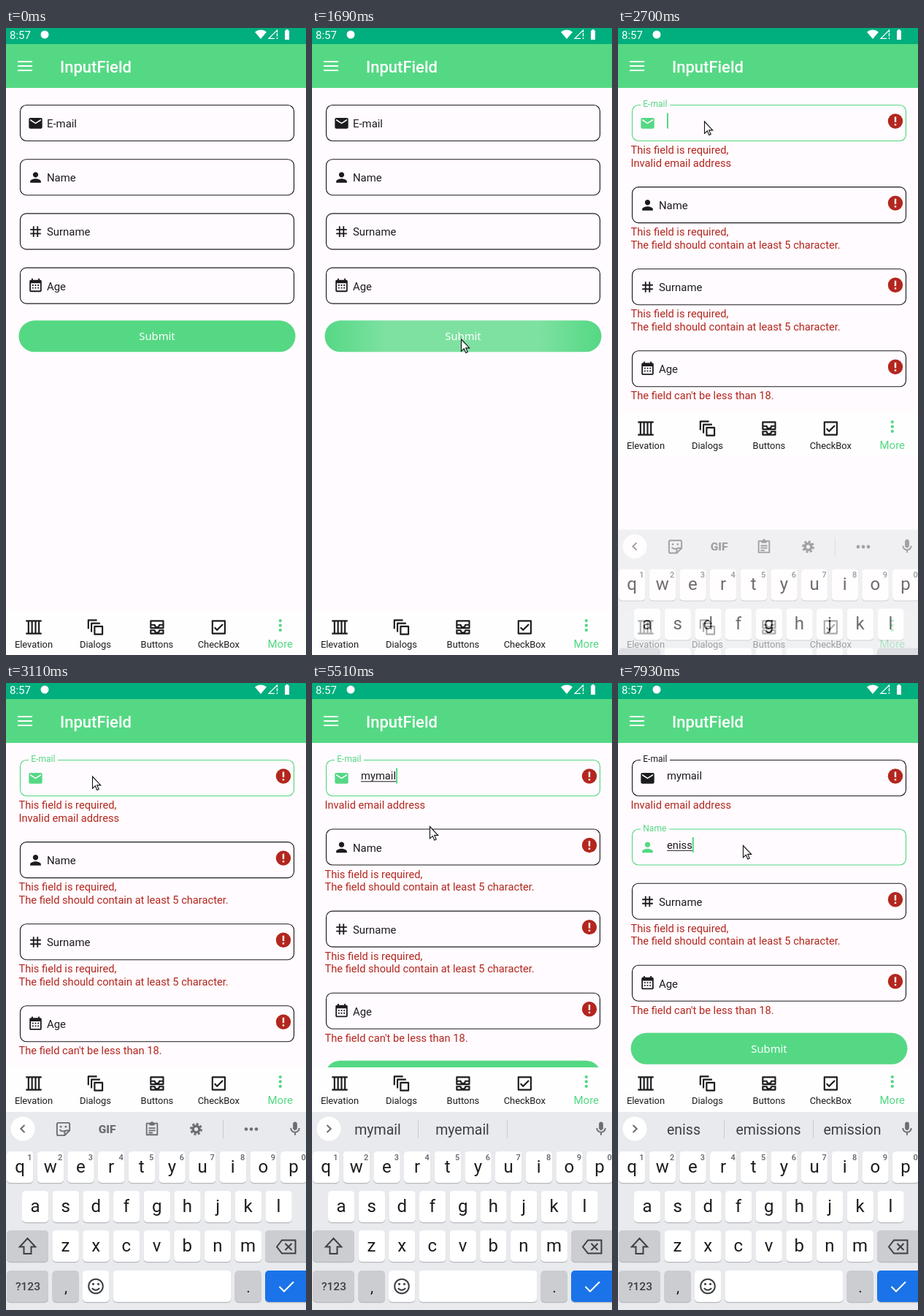
These frames come from a looping animation (411 by 858 pixels, 8000 ms). An HTML page:

```html
<!DOCTYPE html>
<html lang="en">
<head>
<meta charset="utf-8">
<title>InputField</title>
<style>
  html, body { margin: 0; width: 100%; height: 100%; overflow: hidden; background: #fffbfe; }
  svg { display: block; width: 100%; height: 100%; }
  text { font-family: Roboto, "Noto Sans", sans-serif; }
  .mid { text-anchor: middle; }
  .line { fill: none; stroke: currentColor; stroke-width: 2; }
  .ink { color: #1c1b1f; fill: #1c1b1f; }
  .tool { color: #6a6e73; fill: #6a6e73; }
  .error { fill: #b3261e; font-size: 14.65px; }
</style>
</head>
<body>
<svg id="stage" viewBox="0 0 411 858"></svg>
<script>
const LOOP = 8000;
const GREEN = '#55d884', INK = '#1c1b1f', PAGE = '#fffbfe';
const stage = document.getElementById('stage');
const $ = id => document.getElementById(id);

// ---- drawing helpers ----
const text = (x, y, size, str, extra = '') => `<text x="${x}" y="${y}" font-size="${size}" ${extra}>${str}</text>`;
const rect = (x, y, w, h, fill, r = 0) => `<rect x="${x}" y="${y}" width="${w}" height="${h}" rx="${r}" fill="${fill}"/>`;
const line = (d, extra = '') => `<path class="line" d="${d}" ${extra}/>`;
const dot = (x, y, r, fill = 'currentColor') => `<circle cx="${x}" cy="${y}" r="${r}" fill="${fill}"/>`;
const icon = (x, y, size, body) =>
  `<g transform="translate(${x - size / 2} ${y - size / 2}) scale(${size / 24})">${body}</g>`;
const solid = d => `<path fill-rule="evenodd" d="${d}"/>`;

const ICONS = {
  mail: solid('M20 4H4c-1.1 0-2 .9-2 2v12c0 1.1.9 2 2 2h16c1.1 0 2-.9 2-2V6c0-1.1-.9-2-2-2zm0 4l-8 5-8-5V6l8 5 8-5v2z'),
  person: solid('M12 12c2.2 0 4-1.8 4-4s-1.8-4-4-4-4 1.8-4 4 1.8 4 4 4zm0 2c-2.7 0-8 1.3-8 4v2h16v-2c0-2.7-5.3-4-8-4z'),
  hash: line('M4 9H20M4 15H20M9 4V20M15 4V20'),
  calendar: solid('M19 3h-1V1h-2v2H8V1H6v2H5c-1.1 0-2 .9-2 2v14c0 1.1.9 2 2 2h14c1.1 0 2-.9 2-2V5c0-1.1-.9-2-2-2zm0 16H5V8h14v11z') +
    line('M7 11H17M7 15H17', 'stroke-dasharray="2"'),
  columns: line('M2 4H22M2 20H22M5.3 4V20M9.8 4V20M14.3 4V20M18.7 4V20'),
  layers: line('M3 14V3H14M7 18V7H18M11 11H21V21H11Z', 'stroke-linejoin="round"'),
  trays: line('M4 4H20V13H4ZM4 9H9a3 3 0 0 0 6 0H20M3 16H9a3 3 0 0 0 6 0H21M4 16V20H20V16', 'stroke-linejoin="round"'),
  check: line('M4 4H20V20H4Z', 'stroke-linejoin="round"') + line('M6.7 12.3L10 15.6L17.3 8.3'),
  more: [6, 12, 18].map(y => dot(12, y, 2)).join(''),
  mic: solid('M12 14c1.7 0 3-1.3 3-3V5c0-1.7-1.3-3-3-3S9 3.3 9 5v6c0 1.7 1.3 3 3 3z') + line('M6 11a6 6 0 0 0 12 0M12 17V21'),
  gear: `<circle class="line" cx="12" cy="12" r="5" style="stroke-width:4"/>
    <circle class="line" cx="12" cy="12" r="8.2" stroke-dasharray="3.5 2.94" style="stroke-width:3"/>`,
  clipboard: line('M4 4H20V21H4Z', 'stroke-linejoin="round"') + solid('M8 3h2a2 2 0 0 1 4 0h2v4H8z') + line('M7 11H17M7 14.5H17M7 18H13'),
  sticker: line('M3 5a2 2 0 0 1 2-2H19a2 2 0 0 1 2 2V14L14 21H5a2 2 0 0 1-2-2ZM20 14H16a2 2 0 0 0-2 2V20') +
    line('M7 12.5a5 4 0 0 0 7 2') + dot(8.5, 8.5, 1.4) + dot(15.5, 8.5, 1.4)
};

// ---- screen parts ----
function header() {
  return rect(0, 0, 411, 22, '#00ae7e') + rect(0, 22, 411, 60, GREEN) +
    `<g fill="#fff" color="#fff">` +
    text(5, 15, 15, '8:57') + dot(53, 9, 5.5) +
    `<path d="M349 15L341 5.5a12 12 0 0 1 16 0Z"/>` +
    line('M368 14.4H360L371.5 3V6', 'style="stroke-width:1.2"') + line('M371.5 7V11.5M371.5 13V15', 'style="stroke-width:1.4"') +
    `<path d="M382 3.5h1.5V2h3v1.5H388V16h-6z"/>` +
    line('M16 46H36M16 52H36M16 58H36') +
    text(74, 60.5, 22, 'InputField', 'font-weight="500"') + `</g>`;
}

function nav() {
  const items = [['Elevation', 'columns'], ['Dialogs', 'layers'], ['Buttons', 'trays'], ['CheckBox', 'check'], ['More', 'more']];
  return rect(0, 798, 411, 60, '#fefefe') + items.map(([name, ic], i) => {
    const x = 38 + 84.45 * i, on = i === 4;
    return `<g class="mid" fill="${on ? GREEN : INK}" color="${on ? GREEN : INK}">` +
      icon(x, on ? 817.5 : 820, 25.7, ICONS[ic]) +
      text(x, on ? 847.5 : 847.6, on ? 15 : 12.9, name) + `</g>`;
  }).join('');
}

function key(x, y, w, fill = '#fff') {
  return rect(x, y + 1.2, w, 43, '#b6b9bd', 5) + rect(x, y, w, 43, fill, 5);
}

function keyboard() {
  const GREY = '#cbcdd1', step = 41.67;
  const rows = [['qwertyuiop', 19, 641], ['asdfghjkl', 40, 695], ['zxcvbnm', 81.5, 749]];
  let out = rect(0, 587, 411, 271, '#e8eaed') + `<g class="mid ink">`;
  for (const [chars, x0, y] of rows) {
    [...chars].forEach((c, i) => {
      const x = x0 + step * i;
      out += key(x - 18, y, 36.4) + text(x, y + 28.7, 24, c);
      if (y === 641) out += text(x + 13.5, y + 11.5, 11, (i + 1) % 10, 'font-weight="500" fill="#5f6368"');
    });
  }
  out += key(1, 749, 57, GREY) + key(355, 749, 62, GREY) + key(1, 804, 57, GREY) + key(63.5, 804, 36.4, GREY) +
    key(105, 804, 36.4) + key(146.5, 804, 162) + key(313.5, 804, 36.4, GREY) + key(355, 804, 62, '#1a73e8') +
    text(30, 831, 15.5, '?123', 'font-weight="500" fill="#3c4043"') + text(82, 834, 21, ',') + text(332, 834, 21, '.') +
    `<g color="#3c4043">` + line('M29.5 760L18.8 771.5H24.5V781H34.5V771.5H40.2Z') +
    line('M371 771.5L378 762.5H396.5V780.5H378ZM382.5 767L391.5 776M391.5 767L382.5 776') +
    `<circle class="line" cx="123" cy="825.5" r="9.8"/>` + dot(119.5, 822.5, 1.6) + dot(126.5, 822.5, 1.6) +
    line('M118 828a5.5 4.5 0 0 0 10 0') + `</g>` +
    line('M374.5 826L381 832.5L394 819.5', 'color="#fff"') + `</g>`;

  // suggestion strip
  out += dot(23, 610, 16.5, '#fff') + `<g class="tool">` +
    line('', 'id="chevron"') + icon(396, 610, 23, ICONS.mic) +
    `<g id="tools">` + icon(78.5, 610.5, 23, ICONS.sticker) +
    text(138.5, 616, 15.5, 'GIF', 'class="mid" font-weight="800"') +
    icon(200, 610, 22, ICONS.clipboard) + icon(260.5, 610.5, 21, ICONS.gear) +
    line('M297.5 598V623', 'style="stroke:#c9ccd0;stroke-width:1"') +
    dot(329, 610.5, 2.3) + dot(336, 610.5, 2.3) + dot(343, 610.5, 2.3) + `</g>` +
    `<g id="words" class="mid" fill="#3c4043">` + [90, 206, 321].map(x => text(x, 618, 19.5, '')).join('') +
    line('M145.5 598V623M267.5 598V623', 'style="stroke:#c9ccd0;stroke-width:1"') + `</g></g>`;
  return out;
}

const FIELDS = [['E-mail', 'mail'], ['Name', 'person'], ['Surname', 'hash'], ['Age', 'calendar']];

function field([, ic], i) {
  return `<g id="field${i}">
    <rect class="box" x="19.5" y=".5" width="375" height="49" rx="8.5" fill="none" stroke-width="1.15"/>
    <rect class="notch" x="31" y="-2" height="5" fill="${PAGE}"/>
    <g class="icon">${icon(40.5, 25.3, 22, ICONS[ic])}</g>
    <text class="label">${FIELDS[i][0]}</text>
    <text class="value" x="67" y="27.3" font-size="14.75" fill="${INK}"></text>
    <rect class="under" x="67" y="29.3" height="1" fill="${INK}"/>
    <rect class="caret" y="11.5" width="2" height="21" fill="${GREEN}"/>
    <g class="bad">${dot(380, 22.5, 10.2, '#b3261e')}${rect(378.8, 16.5, 2.4, 7.5, '#fff')}${rect(378.8, 26, 2.4, 2.4, '#fff')}</g>
    <text class="error" x="17.5" y="67"></text><text class="error" x="17.5" y="84.7"></text>
  </g>`;
}

stage.innerHTML = `<defs>
    <radialGradient id="glow" gradientUnits="userSpaceOnUse" cx="206" cy="22">
      <stop offset=".55" stop-color="#fff" stop-opacity=".24"/><stop offset="1" stop-color="#fff" stop-opacity="0"/>
    </radialGradient>
  </defs>` +
  rect(0, 0, 411, 858, PAGE) + FIELDS.map(field).join('') +
  `<g id="submit">${rect(17.5, 0, 379, 43, GREEN, 21.5)}<rect id="ripple" x="17.5" width="379" height="43" rx="21.5" fill="url(#glow)"/>
    <text x="207" y="27.2" class="mid" fill="#fff" font-size="14.8" style="font-family:'Noto Sans',sans-serif">Submit</text></g>
  <g>${nav()}</g><g id="raisedNav" transform="translate(0 -272)">${nav()}</g>
  <g id="keyboard">${keyboard()}</g>${header()}
  <path id="cursor" d="M0 0V16.3L3.8 12.8L6.3 18.5L8.7 17.5L6.2 11.9H11.2Z" fill="#fff" stroke="#111" stroke-width="1.1"/>`;

const parts = FIELDS.map((_, i) => {
  const g = $('field' + i), find = c => g.querySelector('.' + c);
  return { g, box: find('box'), notch: find('notch'), icon: find('icon'), label: find('label'), value: find('value'),
    under: find('under'), caret: find('caret'), bad: find('bad'), errors: g.querySelectorAll('.error') };
});
const words = $('words').querySelectorAll('text');

// ---- timeline ----
const REQUIRED = 'This field is required,', LENGTH = 'The field should contain at least 5 character.',
  ADDRESS = 'Invalid email address', YOUNG = "The field can't be less than 18.";
const SENT = 1760, FOCUS = [2570, 5720];

const TYPED = [
  [[0, ''], [3300, 'm'], [3430, 'my'], [3570, 'mym'], [3640, 'myma'], [3840, 'mymai'], [4040, 'mymail']],
  [[0, ''], [6390, 'e'], [6870, 'en'], [7000, 'enis'], [7660, 'eniss']]
];
const STRIP = [[0, ''], [3500, 'my,myself,mystery'], [3770, 'myma,mama,'], [4040, 'mymail,myemail,'], [5850, ''],
  [6590, 'e,each,every'], [6870, 'en,end,enigmatic'], [7190, 'enis,enlist,emissions'], [7860, 'eniss,emissions,emission']];
const BLINK = [[0, 0], [2640, 1], [3110, 0], [3300, 1], [4580, 0], [5050, 1]];
const PATH = [[70, 365, 774], [680, 164, 154], [890, 164, 154], [1480, 204.5, 426], [1980, 204.5, 426], [2310, 107, 117],
  [2430, 118.5, 128], [5500, 118.5, 128], [5510, 161.5, 196.5], [5640, 166.5, 219.5], [7850, 166.5, 219.5], [7925, 171.5, 222.5]];

const ramp = (t, a, b) => Math.min(1, Math.max(0, (t - a) / (b - a)));
const mix = (a, b, p) => a + (b - a) * p;
const ease = p => p * p * (3 - 2 * p);
const at = (list, t) => list.filter(e => e[0] <= t).pop()[1];
const set = (node, attrs) => { for (const k in attrs) node.setAttribute(k, attrs[k]); };
const show = (node, on) => set(node, { visibility: on ? 'visible' : 'hidden' });

function errorsAt(t) {
  if (t < SENT) return [[], [], [], []];
  return [
    t < 3300 ? [REQUIRED, ADDRESS] : [ADDRESS],
    t < 6390 ? [REQUIRED, LENGTH] : t < 7660 ? [LENGTH] : [],
    [REQUIRED, LENGTH], [YOUNG]
  ];
}

function drawFields(t) {
  const errors = errorsAt(t);
  const focus = t < FOCUS[0] ? -1 : t < FOCUS[1] ? 0 : 1;
  let y = 105;
  parts.forEach((f, i) => {
    const on = focus === i, color = on ? GREEN : INK, errs = errors[i];
    const up = i < 2 ? ease(ramp(t, FOCUS[i], FOCUS[i] + 125)) : 0;
    set(f.g, { transform: `translate(0 ${y})` });
    set(f.box, { stroke: color });
    set(f.icon, { fill: color, color });
    set(f.label, { x: mix(56, 34.3, up), y: mix(31, 3.2, up), 'font-size': mix(14.9, 12, up), fill: color });
    set(f.notch, { width: up ? (f.label.getComputedTextLength() + 7) * up : 0 });

    f.value.textContent = i < 2 ? at(TYPED[i], t) : '';
    const w = f.value.textContent ? f.value.getComputedTextLength() : 0;
    // the lone first letter of the name is not underlined until words are suggested
    set(f.under, { width: on && at(STRIP, t) ? w : 0 });
    set(f.caret, { x: 67 + w });
    show(f.caret, on && up > .5 && at(BLINK, t));

    show(f.bad, errs.length);
    f.errors.forEach((e, n) => { e.textContent = errs[n] || ''; });
    y += (i === 3 ? 72.7 : 74.2) + (errs.length ? 20.3 : 0) + (errs.length > 1 ? 17.6 : 0);
  });
  set($('submit'), { transform: `translate(0 ${y})` });
  set($('glow'), { r: mix(15, 188, ramp(t, 1560, 1690)) + 400 * ramp(t, 1690, 1890) });
  set($('ripple'), { opacity: ramp(t, 1550, 1600) * (1 - ramp(t, 1760, 1890)) });
}

function drawKeyboard(t) {
  const p = ramp(t, 2617, 2830);
  show($('raisedNav'), t >= 2635);
  set($('keyboard'), { transform: `translate(0 ${271 * (1 - p) ** 2})`, opacity: p ? .4 + .6 * p : 0 });
  const list = at(STRIP, t).split(','), suggests = list.length > 1;
  set($('tools'), { display: suggests ? 'none' : 'inline' });
  set($('words'), { display: suggests ? 'inline' : 'none' });
  words.forEach((w, i) => { w.textContent = list[i] || ''; });
  set($('chevron'), { d: suggests ? 'M20.5 605L25.7 610L20.5 615' : 'M25.5 605L20.3 610L25.5 615' });
}

function drawCursor(t) {
  const n = PATH.findLastIndex(k => k[0] <= t);
  show($('cursor'), n >= 0);
  if (n < 0) return;
  const a = PATH[n], b = PATH[n + 1] || a;
  const p = a === b ? 0 : ease(ramp(t, a[0], b[0]));
  set($('cursor'), { transform: `translate(${mix(a[1], b[1], p)} ${mix(a[2], b[2], p)})` });
}

const start = performance.now();
function frame() {
  const t = (performance.now() - start) % LOOP;
  drawFields(t);
  drawKeyboard(t);
  drawCursor(t);
  requestAnimationFrame(frame);
}
frame();
</script>
</body>
</html>
```
